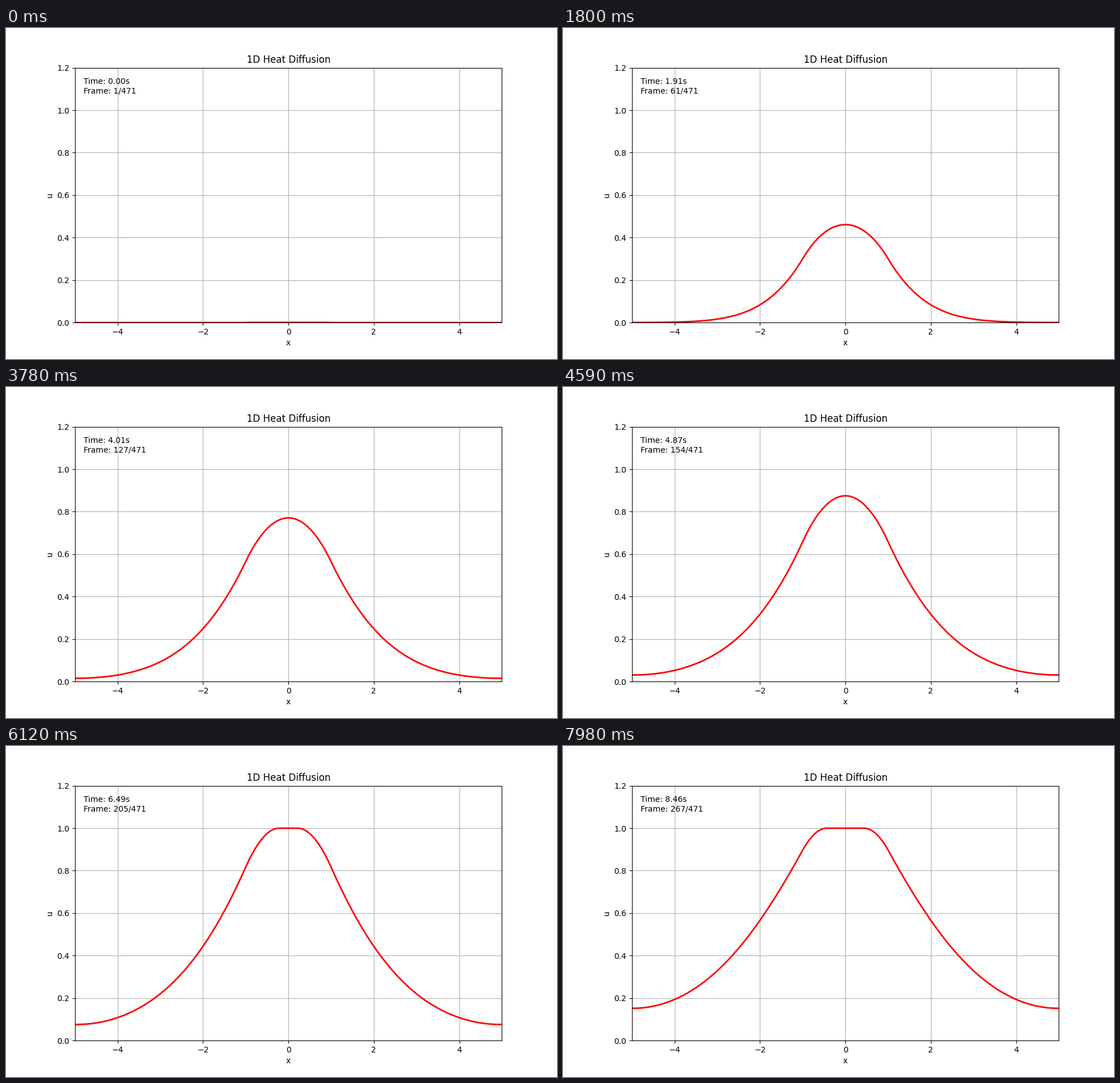
Animation of 966x580 px, one loop 8 s. Source, as a matplotlib script:

```python
import numpy as np
import matplotlib.pyplot as plt
from matplotlib.animation import FuncAnimation

plt.rcParams["font.family"] = "DejaVu Sans"

# Physical model: rod heated in the middle, capped at 1, insulated ends
N = 200
DIFFUSIVITY = 0.5
HEAT_RATE = 0.33
STEPS_PER_STATE = 14
TOTAL_STATES = 471
SHOWN_STATES = 267

# Playback
LOOP_MS = 8000
TICK_MS = 20
STATE_MS = 30

x = np.linspace(-5, 5, N)
dx = x[1] - x[0]
dt = 0.9 * dx**2 / (2 * DIFFUSIVITY)
heat = np.where(np.abs(x) <= 1, HEAT_RATE, 0.0)


def step(u):
    new = u.copy()
    lap = (u[2:] - 2 * u[1:-1] + u[:-2]) / dx**2
    new[1:-1] += dt * (DIFFUSIVITY * lap + heat[1:-1])
    new[0], new[-1] = new[1], new[-2]
    return np.minimum(new, 1.0)


def simulate():
    u = np.zeros(N)
    states = []
    for n in range((SHOWN_STATES - 1) * STEPS_PER_STATE + 1):
        u = step(u)
        if n % STEPS_PER_STATE == 0:
            states.append(u)
    return states


states = simulate()

fig, ax = plt.subplots(figsize=(9.66, 5.8), dpi=100)
line, = ax.plot(x, states[0], color="red", lw=2)
label = ax.text(0.02, 0.90, "", transform=ax.transAxes)
ax.set_xlim(-5, 5)
ax.set_ylim(0, 1.2)
ax.set_xlabel("x")
ax.set_ylabel("u")
ax.set_title("1D Heat Diffusion")
ax.grid(True)


def update(i):
    k = min((i * TICK_MS + TICK_MS // 2) // STATE_MS, SHOWN_STATES - 1)
    line.set_ydata(states[k])
    time = k * STEPS_PER_STATE * dt
    label.set_text(f"Time: {time:.2f}s\nFrame: {k + 1}/{TOTAL_STATES}")
    return line, label


anim = FuncAnimation(fig, update, frames=LOOP_MS // TICK_MS,
                     interval=TICK_MS, repeat=True, repeat_delay=0)
plt.show()
```
